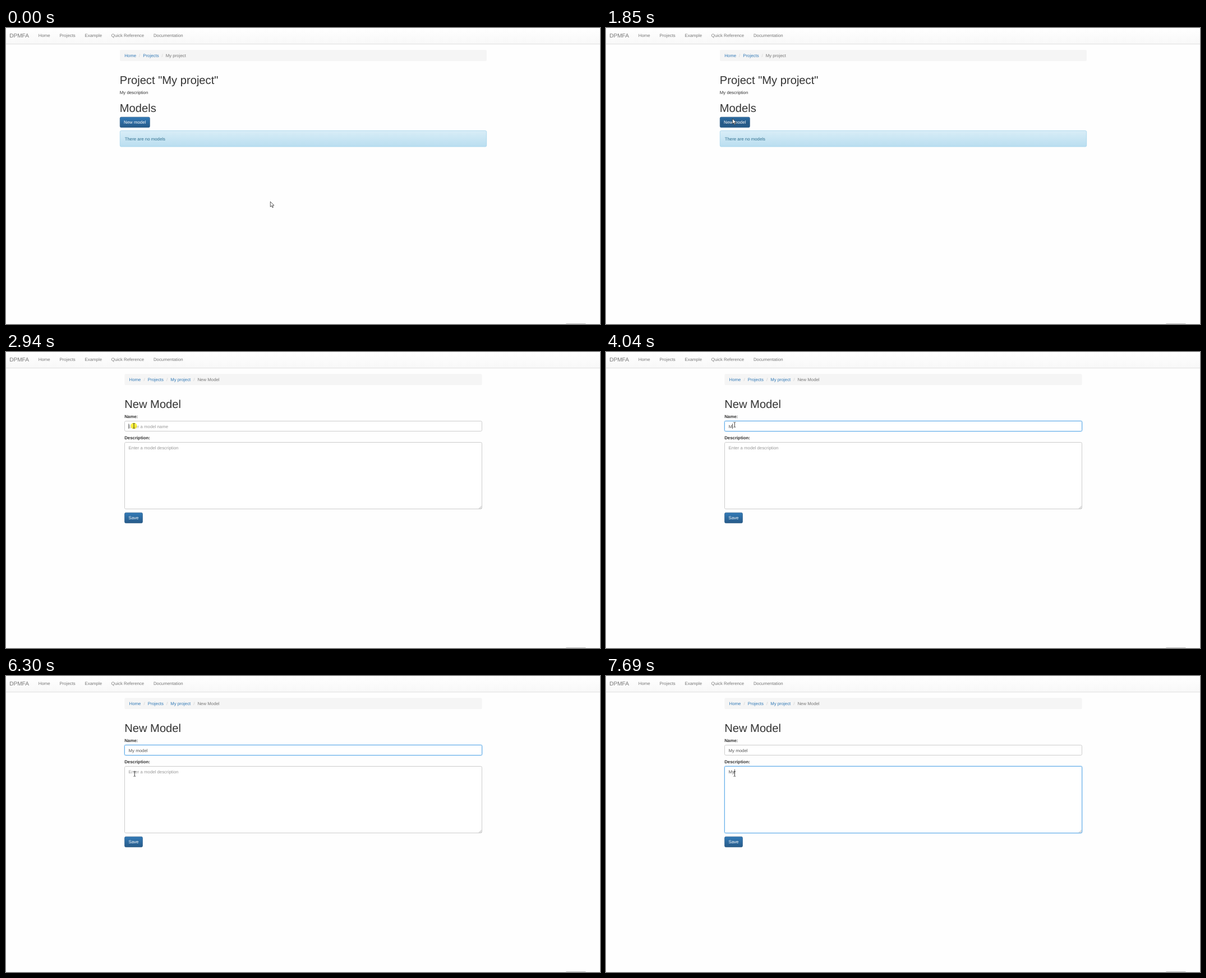
Write an HTML page that moves like this. It is 1059 by 529 pixels and loops after 8000 ms.

```html
<!DOCTYPE html>
<html lang="en">
<head>
<meta charset="utf-8">
<title>New model form</title>
<style>
  html, body { margin: 0; width: 100%; height: 100%; overflow: hidden; background: #fefefe; }
  svg { display: block; width: 100%; height: 100%; }
  text { font: 7.84px "Liberation Sans", Arial, sans-serif; fill: #333; white-space: pre; text-rendering: geometricPrecision; }
  .brand { font-size: 10.08px; fill: #777; }
  .heading { font-size: 20.16px; }
  .label { font-weight: bold; }
  .muted { fill: #777; }
  .link { fill: #337ab7; }
  .slash { fill: #ccc; }
  .info { fill: #31708f; }
  .caption { fill: #fff; }
  .placeholder { fill: #999; }
  .value { fill: #555; }
  .button { stroke: #245580; stroke-width: .6; }
  .glow { fill: none; stroke: #66afe9; stroke-width: 3; }
  .pointer { fill: #fff; stroke: #222; stroke-width: .75; stroke-linejoin: round; }
  .beam { fill: none; stroke: #222; stroke-width: .85; }
</style>
</head>
<body>
<svg viewBox="0 0 1059 529">
  <defs>
    <linearGradient id="navFill" x2="0" y2="1"><stop stop-color="#fff"/><stop offset="1" stop-color="#f8f8f8"/></linearGradient>
    <linearGradient id="infoFill" x2="0" y2="1"><stop stop-color="#d9edf7"/><stop offset="1" stop-color="#b9def0"/></linearGradient>
    <linearGradient id="buttonFill" x2="0" y2="1"><stop stop-color="#337ab7"/><stop offset="1" stop-color="#265a88"/></linearGradient>
    <linearGradient id="hoverFill" x2="0" y2="1"><stop stop-color="#2d6ca2"/><stop offset=".56" stop-color="#265a88"/></linearGradient>
  </defs>

  <rect width="1059" height="28" fill="url(#navFill)"/>
  <rect y="28" width="1059" height="1" fill="#e4e4e4"/>
  <rect y="29" width="1059" height="1" fill="#f8f8f8"/>
  <text class="brand" x="6.2" y="17.2">DPMFA</text>
  <text class="muted" id="nav" x="57.8" y="16.4"></text>
  <rect x="998.5" y="528" width="35" height="1" fill="#bbb"/>

  <g id="projectPage">
    <rect x="203" y="39.3" width="654" height="20" rx="2.2" fill="#f5f5f5"/>
    <text id="projectTrail" x="211.2" y="52"></text>
    <text class="heading" x="202.8" y="99.6">Project "My project"</text>
    <text x="202.8" y="117.6">My description</text>
    <text class="heading" x="202.8" y="149.6">Models</text>
    <rect class="button" id="newButton" x="203.2" y="159.2" width="53.2" height="18.5" rx="2.2"/>
    <text class="caption" x="210.1" y="171.3">New model</text>
    <rect x="203.3" y="183.5" width="653.4" height="28.6" rx="2.2" fill="url(#infoFill)" stroke="#9acfea" stroke-width=".7"/>
    <text class="info" x="211.7" y="200.8">There are no models</text>
  </g>

  <g id="formPage">
    <rect x="211.3" y="39.3" width="637.4" height="20" rx="2.2" fill="#f5f5f5"/>
    <text id="formTrail" x="219.6" y="52"></text>
    <text class="heading" x="211.2" y="99.6">New Model</text>
    <text class="label" x="211.2" y="117.6">Name:</text>
    <g id="nameField"></g>
    <text class="label" x="211.2" y="156.1">Description:</text>
    <g id="descriptionField"></g>
    <path d="M843.3 280L847.8 275.5M845.8 280L847.8 278" stroke="#777" stroke-width=".6"/>
    <rect class="button" x="211.5" y="287.2" width="32" height="18.5" rx="2.2" fill="url(#buttonFill)"/>
    <text class="caption" x="218.5" y="299.3">Save</text>
  </g>

  <circle id="click" r="5.6" fill="#fff000" opacity=".75"/>
  <g id="cursor">
    <path class="pointer" id="arrow" d="M0 0V9.3L2.2 7.3L3.6 10.7L5.1 10.1L3.7 6.8H6.6Z"/>
    <path class="pointer" id="hand" d="M-1.1 1Q-1.1 0 0 0Q1.1 0 1.1 1V4.4L4 5.1Q5.5 5.5 5.5 7V9L4.5 12.6H-.8L-3.6 8.2Q-3.4 6.6-2 7.4L-1.1 8.4Z"/>
    <path class="beam" id="beam" d="M-1.8-4.4Q0-4.4 0-3.5V3.5Q0 4.4-1.8 4.4M1.8-4.4Q0-4.4 0-3.5M0 3.5Q0 4.4 1.8 4.4"/>
  </g>
</svg>

<script>
const LOOP = 8000;
const FORM_OPENS = 1920;
const $ = id => document.getElementById(id);
const show = (node, on) => node.style.display = on ? "" : "none";
const within = (t, spans) => spans.some(([from, to]) => t >= from && t < to);
const mix = (a, b, k) => `rgb(${a.map((v, i) => Math.round(v + (b[i] - v) * k))})`;

// Progress from 0 to 1 in a number of equal jumps, the first at `start`, the last at `end`.
function stepped(t, start, end, count) {
  const jumps = Math.floor((t - start) / (end - start) * (count - 1) + 1e-6) + 1;
  return Math.min(Math.max(jumps / count, 0), 1);
}

const GREY = [204, 204, 204], BLUE = [102, 175, 233];

const fields = [
  {
    id: "nameField", top: 123.5, height: 18, baseline: 135.6,
    hint: "Enter a model name", text: "My model",
    keys: [4040, 4190, 4600, 4760, 4920, 5060, 5210, 5290],
    caretOn: [[2940, 3490], [4040, 5840], [6380, 6460]],
    loading: [85, 85, 85],
    focus: t => stepped(t, 3030, 3170, 3) - stepped(t, 6540, 6620, 2)
  },
  {
    id: "descriptionField", top: 161.5, height: 119, baseline: 174.1,
    hint: "Enter a model description", text: "My",
    keys: [7460, 7690],
    caretOn: [[6460, 7010], [7460, LOOP]],
    loading: [153, 153, 153],
    focus: t => stepped(t, 6540, 6620, 2)
  }
];

for (const f of fields) {
  const box = `x="211.5" y="${f.top}" width="637" height="${f.height}" rx="2.2"`;
  $(f.id).innerHTML = `<rect class="glow" ${box}/><rect ${box} fill="#fff"/>
    <text x="218.6" y="${f.baseline}"></text>
    <rect y="${f.baseline - 7.4}" width=".8" height="9" fill="#333"/>`;
  [f.glow, f.box, f.label, f.caret] = $(f.id).children;
}

function drawField(f, t) {
  const typed = f.text.slice(0, f.keys.filter(k => t >= k).length);
  f.label.textContent = typed || f.hint;
  f.label.setAttribute("class", typed ? "value" : "placeholder");

  const focus = f.focus(t);
  const loaded = stepped(t, 2010, 2090, 2);
  f.glow.setAttribute("opacity", focus * .28);
  f.box.setAttribute("stroke", loaded < 1 ? mix(f.loading, GREY, loaded) : mix(GREY, BLUE, focus));

  const caretVisible = within(t, f.caretOn);
  show(f.caret, caretVisible);
  if (caretVisible) f.caret.setAttribute("x", 218.5 + (typed ? f.label.getComputedTextLength() : 0));
}

const cursorStart = [471.3, 310.3];
const moves = [
  { start: 530, end: 1300, count: 11, to: [226.5, 162.5] },
  { start: 1380, end: 1450, count: 2, to: [225.5, 162] },
  { start: 2520, end: 2860, count: 6, to: [228, 132] },
  { start: 3030, end: 3170, count: 3, to: [229.3, 130] },
  { start: 5840, end: 6300, count: 7, to: [229.3, 175] }
];
const clicks = [[1680, 1850], [2940, 3100], [6460, 6620]];

function cursorAt(t) {
  return moves.reduce((from, m) => {
    const p = stepped(t, m.start, m.end, m.count);
    const eased = p * p * (3 - 2 * p);
    return from.map((v, i) => v + (m.to[i] - v) * eased);
  }, cursorStart);
}

function drawCursor(t, x, y, hovering) {
  const waiting = t >= 1850 && t < FORM_OPENS;
  const inField = fields.some(f => y >= f.top && y <= f.top + f.height);
  const shape = t < 2520
    ? (hovering && !waiting ? "hand" : "arrow")
    : (inField ? "beam" : "arrow");
  for (const id of ["arrow", "hand", "beam"]) show($(id), id === shape);
  $("cursor").setAttribute("transform", `translate(${x} ${y})`);
  $("click").setAttribute("transform", `translate(${x} ${y})`);
  show($("click"), within(t, clicks));
}

function draw(t) {
  const [x, y] = cursorAt(t);
  const hovering = y < 178 && x < 257;
  const pressed = within(t, clicks.slice(0, 1));
  show($("projectPage"), t < FORM_OPENS);
  show($("formPage"), t >= FORM_OPENS);
  $("newButton").setAttribute("fill", pressed ? "#265a88" : `url(#${hovering ? "hoverFill" : "buttonFill"})`);
  if (t >= FORM_OPENS) fields.forEach(f => drawField(f, t));
  drawCursor(t, x, y, hovering);
}

function trail(id, names) {
  $(id).innerHTML = names.map((name, i) => i < names.length - 1
    ? `<tspan class="link" dx="${i && 5}">${name}</tspan><tspan class="slash" dx="5">/</tspan>`
    : `<tspan class="muted" dx="5">${name}</tspan>`).join("");
}

$("nav").innerHTML = ["Home", "Projects", "Example", "Quick Reference", "Documentation"]
  .map((name, i) => `<tspan dx="${i && 16.8}">${name}</tspan>`).join("");
trail("projectTrail", ["Home", "Projects", "My project"]);
trail("formTrail", ["Home", "Projects", "My project", "New Model"]);

const began = performance.now();
function tick() {
  draw((performance.now() - began) % LOOP);
  requestAnimationFrame(tick);
}
tick();
</script>
</body>
</html>
```
